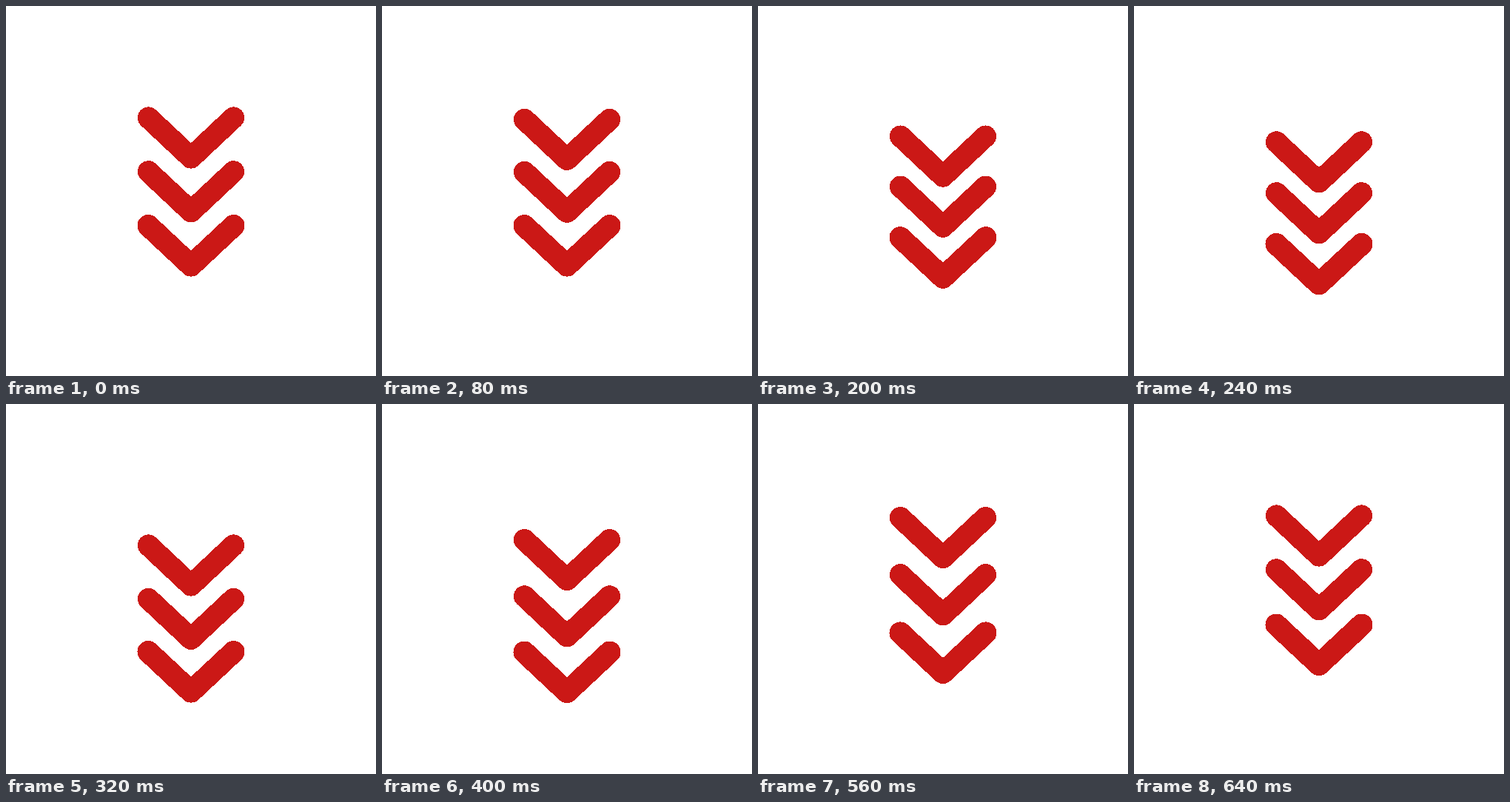
Recreate the animation shown at these times as an HTML page. Size 500 by 500 pixels, loop 660 ms.

```html
<!DOCTYPE html>
<html lang="en">
<head>
<meta charset="utf-8">
<title>Scroll down</title>
<style>
  html, body { margin: 0; width: 100%; height: 100%; overflow: hidden; background: #fff; }
  svg { display: block; width: 100%; height: 100%; }
  path {
    fill: none; stroke: #cb1816; stroke-width: 29.2;
    stroke-linecap: round; stroke-linejoin: round; shape-rendering: crispEdges;
  }
  path:last-child { stroke-width: 29.6; }
</style>
</head>
<body>
<svg viewBox="0 0 500 500">
  <path d="M192.5 151 L250 205 L307.5 151"/>
  <path d="M192.5 223.8 L250 277.8 L307.5 223.8"/>
  <path d="M192.3 296.8 L250 350.8 L307.7 296.8"/>
</svg>
<script>
  const LOOP = 660, STEP = 20, DROP = 40;
  // When each chevron starts down, reaches the bottom and is back up (ms).
  const timing = [[36, 318, 607], [59, 338, 644], [74, 361, 680]];
  const chevrons = document.querySelectorAll('path');

  const ease = (t, from, to) => {
    const u = Math.min(1, Math.max(0, (t - from) / (to - from)));
    return (1 - Math.cos(Math.PI * u)) / 2;
  };

  function draw(now) {
    const t = Math.floor(now % LOOP / STEP) * STEP;
    timing.forEach(([start, bottom, end], i) => {
      const y = DROP * (ease(t, start, bottom) - ease(t, bottom, end));
      chevrons[i].setAttribute('transform', `translate(0 ${y.toFixed(2)})`);
    });
  }

  let origin;
  function frame(now) {
    origin ??= now;
    draw(now - origin);
    requestAnimationFrame(frame);
  }
  draw(0);
  requestAnimationFrame(frame);
</script>
</body>
</html>
```
